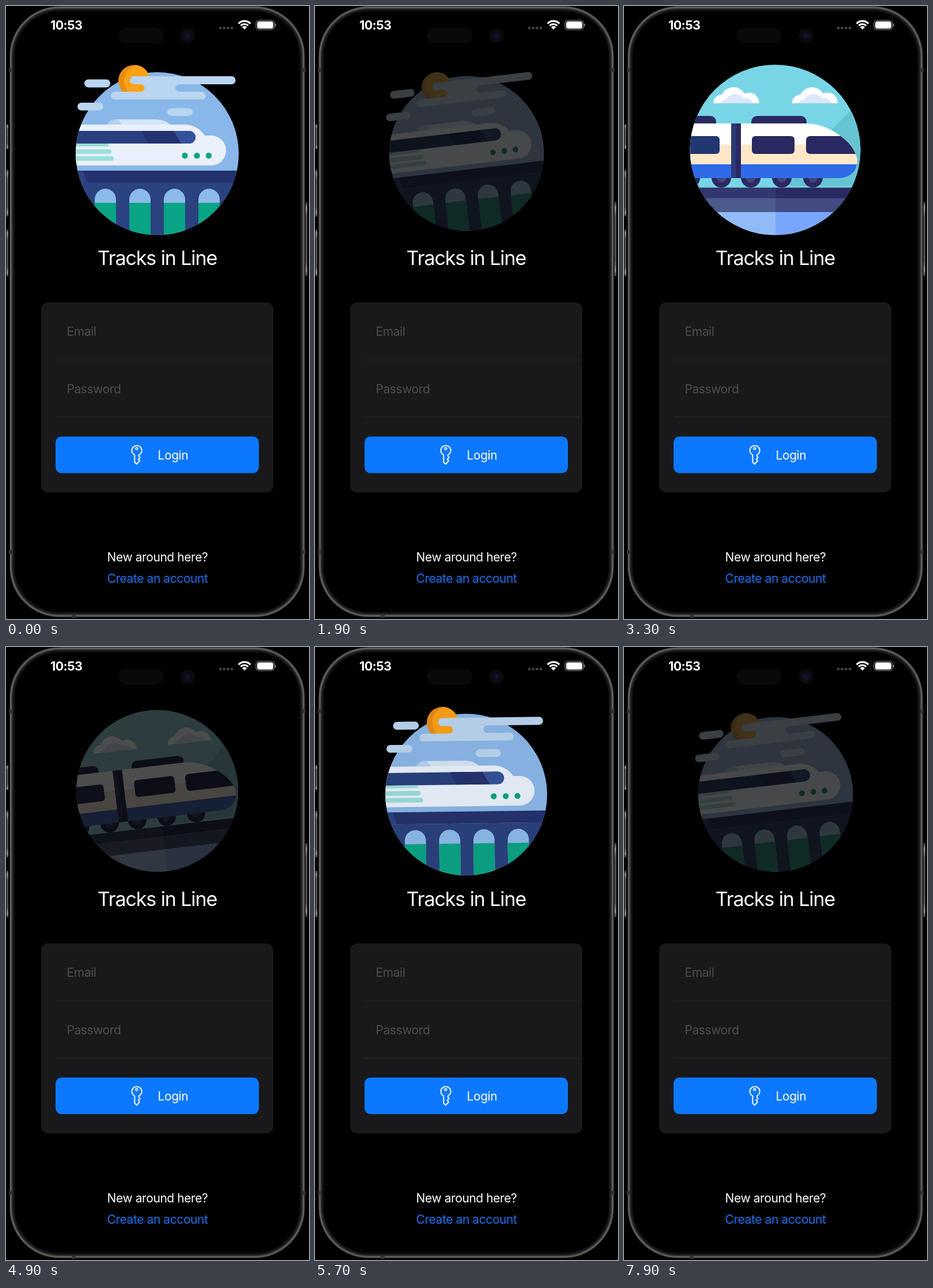
Recreate the animation shown at these times as an HTML page with a canvas. Size 526 by 1065 pixels, loop 8000 ms.

```html
<!DOCTYPE html>
<html lang="en">
<head>
<meta charset="utf-8">
<title>Train login</title>
<style>
html, body { margin: 0; width: 100%; height: 100%; overflow: hidden; background: #000; }
canvas { display: block; width: 526px; height: 1065px; }
</style>
</head>
<body>
<canvas id="stage"></canvas>
<script>
const W = 526, H = 1065, LOOP = 8000, STEP = 100;
const canvas = document.getElementById('stage');
const ctx = canvas.getContext('2d');
const dpr = window.devicePixelRatio || 1;
canvas.width = W * dpr;
canvas.height = H * dpr;

function rect(x0, y0, x1, y1, color) {
  ctx.fillStyle = color;
  ctx.fillRect(x0, y0, x1 - x0, y1 - y0);
}

function round(x0, y0, x1, y1, r, color) {
  ctx.beginPath();
  ctx.roundRect(x0, y0, x1 - x0, y1 - y0, r);
  ctx.fillStyle = color;
  ctx.fill();
}

function capsule(x0, y0, x1, y1, color) {
  round(x0, y0, x1, y1, (y1 - y0) / 2, color);
}

function disc(x, y, r, color) {
  ctx.beginPath();
  ctx.arc(x, y, r, 0, Math.PI * 2);
  ctx.fillStyle = color;
  ctx.fill();
}

function shape(d, color) {
  ctx.fillStyle = color;
  ctx.fill(new Path2D(d));
}

function clipped(x, y, r, draw) {
  ctx.save();
  ctx.beginPath();
  ctx.arc(x, y, r, 0, Math.PI * 2);
  ctx.clip();
  draw();
  ctx.restore();
}

function label(text, x, y, size, color, { align = 'left', weight = 400, spacing = -0.42 } = {}) {
  ctx.font = `${weight} ${size}px Inter, Roboto, sans-serif`;
  ctx.letterSpacing = spacing + 'px';
  ctx.textAlign = align;
  ctx.textBaseline = 'alphabetic';
  ctx.fillStyle = color;
  ctx.fillText(text, x, y);
}

// White express train on a viaduct
function viaduct() {
  const sky = '#8ab7e9', cloud = '#b9d5f0', navy = '#24326f', pier = '#2a427f';
  const white = '#eaf1fc', teal = '#09a485', sun = '#ffa114';

  clipped(262.5, 256.5, 141.5, () => {
    rect(110, 110, 420, 400, sky);
    shape('M176 207 Q178 197 190 197 H262 Q278 198 286 207 Z', '#d6e5f8');
    shape('M176 207 Q178 197 190 197 H192 Q198 200 202 207 Z', '#b5d0f0');
    shape('M110 206 H308 C326 206 338 214 345 225 H356 A26 26 0 0 1 356 277 H110 Z', white);

    round(110, 217, 329, 239, [0, 11, 11, 0], '#28407f');
    shape('M235 217 H292 L304 239 H246 Z', navy);
    shape('M291 217 H318 A11 11 0 0 1 318 239 H304 Z', '#34529b');
    rect(110, 239, 178, 244, '#9adfd8');
    capsule(100, 249, 183, 257, '#9adfd8');
    capsule(100, 261, 187, 269, '#9adfd8');
    for (const x of [310.5, 331.5, 352]) disc(x, 260, 5.2, teal);

    rect(110, 286, 420, 307, navy);
    rect(110, 307, 420, 400, pier);
    shape('M110 286 H133 L141 307 H110 Z', pier);
    for (let i = 0; i < 4; i++) {
      const x = 154 + i * 60;
      round(x, 317.5, x + 37, 400, [18.5, 18.5, 0, 0], '#8cbaea');
      rect(x, 342, x + 37, 400, teal);
    }
  });

  clipped(222.5, 130, 27.5, () => {
    rect(190, 100, 255, 160, '#e98d12');
    disc(234, 130, 29, sun);
  });
  capsule(182, 149, 347, 162.5, cloud);
  capsule(215, 122, 398.5, 136, cloud);
  rect(230, 134, 301, 150, cloud);
  round(220, 136, 240.5, 149, [0, 6.5, 6.5, 0], sun);
  round(294, 136, 330, 149, [6.5, 0, 0, 6.5], sky);
  capsule(136, 127.5, 181, 141.5, cloud);
  capsule(124, 168, 169, 181.5, cloud);
  capsule(280, 177.5, 324, 191, cloud);
}

function puff(x) {
  ctx.save();
  ctx.beginPath();
  ctx.rect(x, 135, 81, 34);
  ctx.clip();
  disc(x + 16, 169, 15, '#fff');
  disc(x + 36, 163, 22, '#fff');
  disc(x + 63, 168, 17.5, '#fff');
  disc(x + 39, 171, 18, '#dbe7fc');
  disc(x + 58, 172, 12, '#dbe7fc');
  disc(x + 22, 173, 10, '#dbe7fc');
  ctx.restore();
}

// Blue and cream commuter train
function commuter() {
  const navy = '#2a2962';
  clipped(262.5, 250, 148, () => {
    rect(110, 100, 415, 400, '#78d5e6');
    shape('M415 160 L263 313 H415 Z', '#66c3d2');
    puff(154);
    puff(290.5);
    round(100, 191, 160, 215, 10, navy);
    round(221, 191, 317, 215, 10, navy);

    for (const x of [115, 169, 220, 274, 328]) {
      disc(x, 298.5, 17, navy);
      disc(x, 298.5, 8, '#45457c');
    }

    ctx.save();
    ctx.clip(new Path2D('M100 204 H318 C342 205 362 215 376 226 C390 236 401 249 405 266 C406 287 392 299 372 299 H100 Z'));
    rect(100, 200, 415, 241, '#fff');
    rect(100, 241, 415, 275, '#ffe7c7');
    rect(100, 275, 415, 300, '#2f6be9');
    round(316, 226, 415, 257, 7, navy);
    ctx.restore();

    round(105, 226, 166, 257, 6, '#22376f');
    round(222, 226, 296, 257, 6, navy);
    rect(186, 204, 203, 299, navy);
    rect(186, 204, 194, 299, '#2d3a76');

    rect(110, 315.5, 263, 334, '#33376f');
    rect(263, 315.5, 415, 334, '#2a2a62');
    rect(110, 334, 263, 358, '#4d5a8c');
    rect(263, 334, 415, 358, '#434c82');
    rect(110, 358, 263, 400, '#91bbf7');
    rect(263, 358, 415, 400, '#78a6ff');
  });
}

const smooth = u => u * u * (3 - 2 * u);

// Each picture leaves and the next arrives once every three seconds.
function pose(t) {
  const half = Math.floor(t / 3000), k = t % 3000;
  if (k <= 1600) return { pic: half % 2, alpha: 1, scale: 1, turn: 0 };
  if (k < 2200) {
    const q = smooth((k - 1600) / 600);
    return { pic: half % 2, alpha: (1 - q) ** 1.75, scale: 1 - 0.1 * q, turn: -13.5 * q };
  }
  const s = smooth(Math.min(1, Math.max(0, (k - 2400) / 360)));
  return { pic: (half + 1) % 2, alpha: Math.sqrt(s), scale: 0.9 + 0.1 * s, turn: -10 * (1 - s) };
}

function picture(t) {
  const p = pose(t);
  if (p.alpha <= 0) return;
  ctx.save();
  ctx.translate(262.5, 250);
  ctx.rotate(p.turn * Math.PI / 180);
  ctx.scale(p.scale, p.scale);
  ctx.translate(-262.5, -250);
  (p.pic ? commuter : viaduct)();
  ctx.restore();
  if (p.alpha === 1) return;

  // Colours pale as the picture fades to black.
  ctx.save();
  ctx.globalCompositeOperation = 'saturation';
  rect(90, 90, 440, 405, `rgba(0,0,0,${0.6 * (1 - p.alpha)})`);
  ctx.restore();
  rect(90, 90, 440, 405, `rgba(0,0,0,${1 - p.alpha})`);
}

function outline(inset, width, color) {
  ctx.beginPath();
  ctx.roundRect(5 + inset, inset - 1, 515 - 2 * inset, 1064 - 2 * inset, 88 - inset);
  ctx.lineWidth = width;
  ctx.strokeStyle = color;
  ctx.stroke();
}

function button(x0, y0, x1, y1) {
  const g = ctx.createLinearGradient(0, y0, 0, y1);
  for (const [at, color] of [[0, '#333'], [0.08, '#888'], [0.2, '#505050'], [0.8, '#505050'], [0.92, '#888'], [1, '#333']]) {
    g.addColorStop(at, color);
  }
  round(x0, y0, x1, y1, 1.5, g);
}

function phone() {
  round(209, 0, 315, 6.5, [0, 0, 4, 4], '#242424');
  outline(5.5, 9, '#141414');
  outline(4, 6, '#2a2a2a');
  outline(3.6, 3.4, '#484848');
  outline(3.4, 1.5, '#686868');
  for (const y of [108, 945]) {
    rect(5, y, 11, y + 7, '#333');
    rect(514, y, 520, y + 7, '#333');
  }
  rect(114, 1057, 121, 1063, '#333');
  button(0.8, 205, 4, 249);
  button(0.8, 284, 4, 366);
  button(0.8, 388, 4, 470);
  button(519.8, 340, 523, 470);

  capsule(195, 38, 273.5, 65, '#090909');
  disc(315.5, 51.5, 12.5, '#0b0b0d');
  disc(315.5, 51.5, 6.5, '#0d0f25');
  disc(315.5, 51.5, 2.5, '#12163a');
}

function statusBar() {
  label('10:53', 77, 41, 21.5, '#fff', { weight: 700, spacing: -0.6 });
  for (let i = 0; i < 4; i++) disc(372 + i * 6.7, 38.3, 2.4, '#444');

  ctx.strokeStyle = '#fff';
  ctx.lineWidth = 3.2;
  for (const r of [14.3, 9]) {
    ctx.beginPath();
    ctx.arc(414, 40.5, r, -Math.PI * 0.755, -Math.PI * 0.245);
    ctx.stroke();
  }
  shape('M414 41 L409.8 36.6 Q414 33 418.2 36.6 Z', '#fff');

  ctx.beginPath();
  ctx.roundRect(434, 24.8, 32, 16.4, 5.5);
  ctx.lineWidth = 1.3;
  ctx.strokeStyle = '#777';
  ctx.stroke();
  round(436, 26.8, 464, 39.2, 3.8, '#fff');
  round(467, 30.5, 469, 35.8, [0, 2, 2, 0], '#777');
}

function keyIcon() {
  ctx.strokeStyle = '#fff';
  ctx.lineWidth = 1.9;
  ctx.lineJoin = 'round';
  ctx.stroke(new Path2D('M223.3 780 A8.6 8.6 0 1 1 230.8 780 V782 L232.6 784.5 L229.6 787.5 L232 790.3 L226.8 796 L223.3 792.6 Z'));
  ctx.beginPath();
  ctx.arc(226.8, 768.8, 1.9, 0, Math.PI * 2);
  ctx.lineWidth = 1.5;
  ctx.stroke();
}

function form() {
  label('Tracks in Line', 262.5, 450, 34, '#fff', { align: 'center', spacing: -1.1 });
  round(61, 515, 464, 845, 12, '#19191b');
  rect(86, 614.5, 464, 615.5, '#2b2b2d');
  rect(86, 713.5, 464, 714.5, '#2b2b2d');
  label('Email', 105.5, 573, 21, '#4d4d50');
  label('Password', 105.5, 672.5, 21, '#4d4d50');
  round(86, 748, 439, 811.5, 10, '#0b78ff');
  keyIcon();
  label('Login', 263.5, 787.5, 21, '#fff');
  label('New around here?', 263, 965, 21, '#fff', { align: 'center' });
  label('Create an account', 263, 1002, 21, '#1d70ee', { align: 'center' });
}

function frame(now) {
  const t = Math.floor((now % LOOP) / STEP) * STEP;
  ctx.setTransform(dpr, 0, 0, dpr, 0, 0);
  rect(0, 0, W, H, '#000');
  phone();
  statusBar();
  picture(t);
  form();
  requestAnimationFrame(() => frame(performance.now()));
}

frame(performance.now());
</script>
</body>
</html>
```
